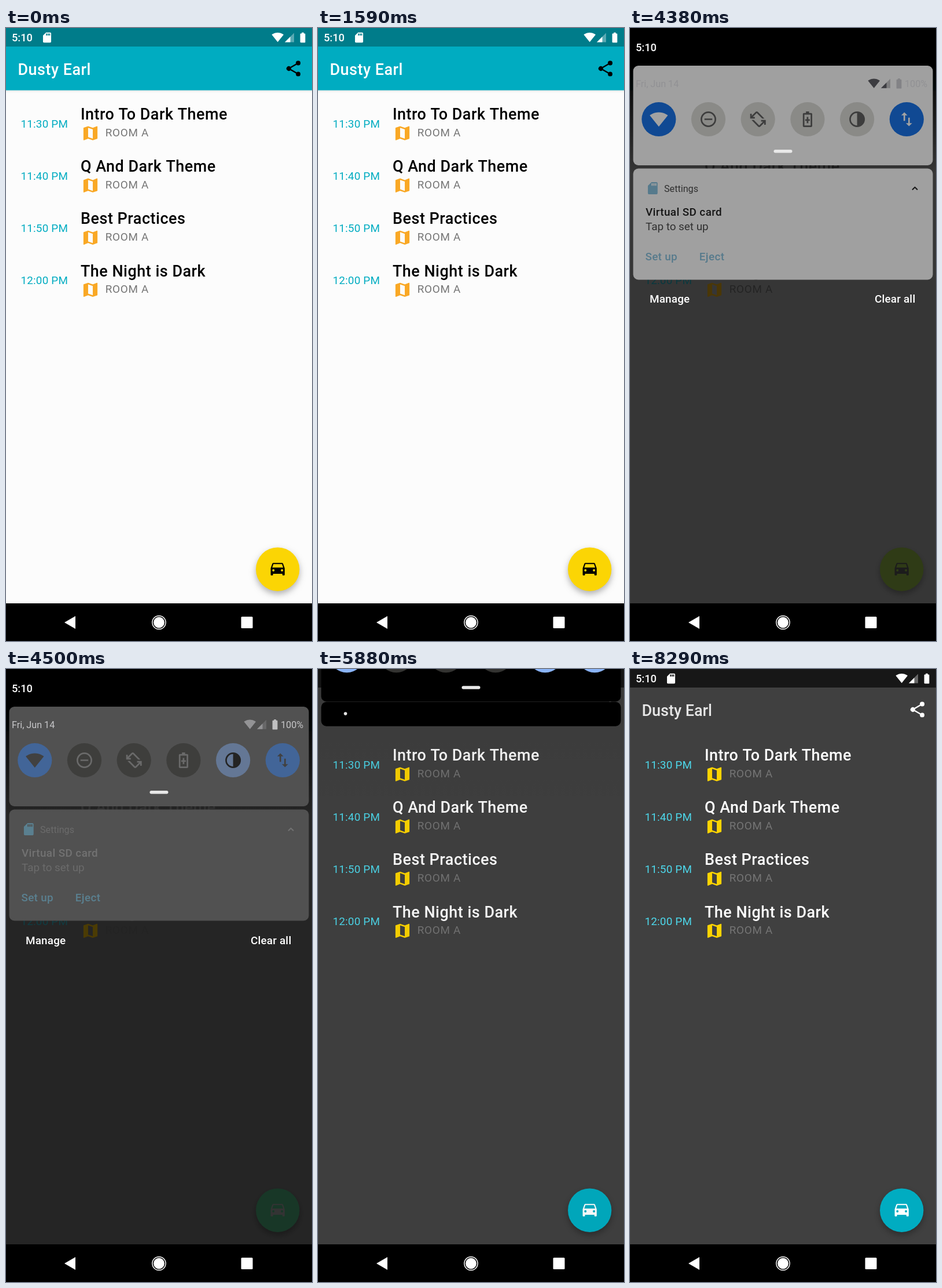
An HTML page with a canvas that plays this animation: 529 px wide and 1058 px high, repeating every 8.33 s.

```html
<!DOCTYPE html>
<html lang="en">
<head>
<meta charset="utf-8">
<title>Schedule</title>
<style>
html, body { margin: 0; width: 100%; height: 100%; overflow: hidden; background: #000; }
canvas { display: block; width: 100vw; height: 100vh; }
</style>
</head>
<body>
<canvas id="stage"></canvas>
<script>
const W = 529, H = 1058, LOOP = 8330, DP = 1.347;
const OPEN = [1620, 1920], CLOSE = [5702, 5961], THEME = [4240, 4625];

const canvas = document.getElementById('stage');
const ratio = window.devicePixelRatio || 1;
canvas.width = W * ratio;
canvas.height = H * ratio;
const ctx = canvas.getContext('2d');

const ICONS = {
  map: 'M20.5 3l-.16.03L15 5.1 9 3 3.36 4.9c-.21.07-.36.25-.36.48V20.5c0 .28.22.5.5.5l.16-.03L9 18.9l6 2.1 5.64-1.9c.21-.07.36-.25.36-.48V3.5c0-.28-.22-.5-.5-.5zM15 19l-6-2.11V5l6 2.11V19z',
  car: 'M18.92 6.01C18.72 5.42 18.16 5 17.5 5h-11c-.66 0-1.21.42-1.42 1.01L3 12v8c0 .55.45 1 1 1h1c.55 0 1-.45 1-1v-1h12v1c0 .55.45 1 1 1h1c.55 0 1-.45 1-1v-8l-2.08-5.99zM6.5 16a1.5 1.5 0 1 1 0-3 1.5 1.5 0 0 1 0 3zm11 0a1.5 1.5 0 1 1 0-3 1.5 1.5 0 0 1 0 3zM5 11l1.5-4.5h11L19 11H5z',
  share: 'M18 16.08c-.76 0-1.44.3-1.96.77L8.91 12.7c.05-.23.09-.46.09-.7s-.04-.47-.09-.7l7.05-4.11c.54.5 1.25.81 2.04.81a3 3 0 1 0-3-3c0 .24.04.47.09.7L8.04 9.81A3 3 0 1 0 8.04 14.19l7.12 4.16c-.05.21-.08.43-.08.65a2.92 2.92 0 1 0 2.92-2.92z',
  wifi: 'M12 21.5L23.64 7c-.45-.34-4.93-4-11.64-4S.81 6.66.36 7z',
  card: 'M18 2h-8L4.02 8 4 20c0 1.1.9 2 2 2h12c1.1 0 2-.9 2-2V4c0-1.1-.9-2-2-2zm-6 6h-2V4h2v4zm3 0h-2V4h2v4zm3 0h-2V4h2v4z',
  battery: 'M15.67 4H14V2h-4v2H8.33C7.6 4 7 4.6 7 5.33v15.33C7 21.4 7.6 22 8.33 22h7.33c.74 0 1.34-.6 1.34-1.33V5.33C17 4.6 16.4 4 15.67 4z',
  data: 'M9 3L5 6.99h3V14h2V6.99h3L9 3zm7 14.01V10h-2v7.01h-3L15 21l4-3.99h-3z',
  dnd: 'M12 2a10 10 0 1 0 0 20a10 10 0 1 0 0-20zm0 2a8 8 0 1 1 0 16a8 8 0 1 1 0-16zM7 11h10v2H7z',
  saver: 'M10 2h4v2h2.6c.8 0 1.4.6 1.4 1.4v15.2c0 .8-.6 1.4-1.4 1.4H7.4c-.8 0-1.4-.6-1.4-1.4V5.4C6 4.6 6.6 4 7.4 4H10zM8 6v14h8V6zM11 9h2v3h2v2h-2v3h-2v-3H9v-2h2z',
  contrast: 'M12 2a10 10 0 1 0 0 20a10 10 0 1 0 0-20zm0 2v16a8 8 0 1 1 0-16z',
  rotate: 'M4 7.59l5-5c.78-.78 2.05-.78 2.83 0L20.24 11h-2.83L10.4 4 5.41 9H8v2H2V5h2V7.59zM20 19h2v-6h-6v2h2.59l-4.99 5-7.01-7H3.76l8.41 8.41c.78.78 2.05.78 2.83 0l5-5V19z'
};
for (const name in ICONS) ICONS[name] = new Path2D(ICONS[name]);

const TALKS = [
  ['11:30 PM', 'Intro To Dark Theme'],
  ['11:40 PM', 'Q And Dark Theme'],
  ['11:50 PM', 'Best Practices'],
  ['12:00 PM', 'The Night is Dark']
];
// icon, on in the light theme, on in the dark theme
const TILES = [
  ['wifi', 1, 1], ['dnd', 0, 0], ['rotate', 0, 0],
  ['saver', 0, 0], ['contrast', 0, 1], ['data', 1, 1]
];

const clamp = v => Math.min(1, Math.max(0, v));
const span = (t, a, b) => clamp((t - a) / (b - a));
const smooth = u => u * u * (3 - 2 * u);

function mix(a, b, k) {
  const part = (hex, i) => parseInt(hex.slice(i, i + 2), 16);
  return '#' + [1, 3, 5].map(i =>
    Math.round(part(a, i) + (part(b, i) - part(a, i)) * k).toString(16).padStart(2, '0')).join('');
}

function text(str, x, y, size, color, weight = 400, spacing = 0) {
  ctx.font = `${weight} ${size}px Roboto, sans-serif`;
  ctx.letterSpacing = spacing + 'px';
  ctx.fillStyle = color;
  ctx.fillText(str, x, y);
}

function icon(name, x, y, scale, color) {
  ctx.save();
  ctx.translate(x, y);
  ctx.scale(scale, scale);
  ctx.translate(-12, -12);
  ctx.fillStyle = color;
  ctx.fill(ICONS[name], 'evenodd');
  ctx.restore();
}

function rect(x, y, w, h, color, r = 0) {
  ctx.fillStyle = color;
  ctx.beginPath();
  ctx.roundRect(x, y, w, h, r);
  ctx.fill();
}

function disc(x, y, r, color) {
  ctx.fillStyle = color;
  ctx.beginPath();
  ctx.arc(x, y, r, 0, Math.PI * 2);
  ctx.fill();
}

function poly(color, ...points) {
  ctx.fillStyle = color;
  ctx.beginPath();
  points.forEach(([x, y]) => ctx.lineTo(x, y));
  ctx.fill();
}

function faded(alpha, draw) {
  if (alpha <= 0) return;
  ctx.save();
  ctx.globalAlpha *= alpha;
  draw();
  ctx.restore();
}

function systemIcons(dx, dy, color, batteryColor) {
  ctx.save();
  ctx.translate(dx, dy);
  icon('wifi', 469.7, 16, 0.88, color);
  faded(0.35, () => poly(color, [482, 24.5], [498, 24.5], [498, 8.5]));
  poly(color, [482, 24.5], [491.5, 24.5], [491.5, 15]);
  icon('battery', 513, 16.5, 0.88, batteryColor);
  ctx.restore();
}

function drawApp(k, statusAlpha) {
  const ink = mix('#000000', '#ffffff', k);
  rect(0, 0, W, H, mix('#fcfcfc', '#404040', k));

  // toolbar and its shadow
  const shade = ctx.createLinearGradient(0, 107, 0, 112);
  shade.addColorStop(0, `rgba(0,0,0,${0.08 * (1 - k)})`);
  shade.addColorStop(1, 'rgba(0,0,0,0)');
  rect(0, 107, W, 5, shade);
  rect(0, 32, W, 75.5, mix('#00acc1', '#404040', k));
  rect(0, 0, W, 32, mix('#007c8a', '#171717', k));
  text('Dusty Earl', 20.5, 80.8, 20 * DP, mix('#ffffff', '#e6e6e6', k), 500, k > 0.5 ? 0 : 0.5);
  icon('share', 497, 70, DP, ink);

  faded(statusAlpha, () => {
    text('5:10', 10, 23, 18.2, '#ffffff', 500);
    icon('card', 71, 16.5, 0.88, '#ffffff');
    systemIcons(0, 0, '#ffffff', '#ffffff');
  });

  TALKS.forEach(([time, title], i) => {
    const y = i * 90.1;
    text(time, 25.5, y + 171.5, 14 * DP, mix('#00acc1', '#4dd9ec', k), 400, 0.2);
    text(title, 129, y + 158.2, 20 * DP, ink, 500, 0.5);
    icon('map', 146, y + 181.6, DP, mix('#f9a825', '#fdd400', k));
    text('ROOM A', 171.8, y + 186.6, 14 * DP, '#757575', 400, 0.7);
  });

  ctx.save();
  ctx.shadowColor = 'rgba(0,0,0,.3)';
  ctx.shadowBlur = 11 * ratio;
  ctx.shadowOffsetY = 5 * ratio;
  disc(469.7, 934.2, 37.7, mix('#fbd504', '#00acc1', k));
  ctx.restore();
  icon('car', 469.7, 932.6, DP, ink);
}

function drawScrim(p) {
  const f = Math.max(0, 1.2 * p - 0.2);
  const depth = 0.5 * (1 - Math.cos(Math.PI * (1 - (1 - f) ** 2)));
  rect(0, 0, W, H, `rgba(0,0,0,${0.7 * depth})`);
  const top = ctx.createLinearGradient(0, 0, 0, 250);
  top.addColorStop(0, '#000');
  top.addColorStop(0.26, '#000');
  top.addColorStop(1, 'rgba(0,0,0,0)');
  faded(depth, () => {
    rect(0, 0, W, 250, top);
    text('5:10', 10, 39.5, 18.2, '#ffffff', 500);
  });
}

function drawCard(p, shift, panel, late) {
  const bottom = 434.5 * p;
  const top = Math.min(242.5 + shift, bottom - 42);
  const strong = mix('#161616', '#e4e4e4', late);
  const soft = mix('#303030', '#b4b4b4', late);
  const accent = mix('#567a8c', '#5f8796', late);
  ctx.save();
  rect(5.5, top, 518, bottom - top, panel, 9);
  ctx.clip();
  faded(span(p, 0.3, 0.7), () => {
    ctx.translate(0, shift);
    icon('card', 39.3, 276.5, 1.05, accent);
    text('Settings', 59, 282.8, 12 * DP, soft);
    ctx.strokeStyle = strong;
    ctx.lineWidth = 2;
    ctx.beginPath();
    ctx.moveTo(488, 279.3);
    ctx.lineTo(492.5, 274.8);
    ctx.lineTo(497, 279.3);
    ctx.stroke();
    text('Virtual SD card', 27, 324, 14 * DP, strong, 500, 0.4);
    text('Tap to set up', 27, 349, 14 * DP, soft);
    text('Set up', 26.5, 401, 14 * DP, accent, 500, 0.3);
    text('Eject', 119.8, 401, 14 * DP, accent, 500, 0.4);
  });
  faded(1 - span(p, 0.25, 0.4), () => disc(47.5, (top + bottom) / 2 - 0.7, 2.8, strong));
  ctx.restore();
}

function drawQuickSettings(shift, panel, k, late) {
  const toned = (light, dark) => mix(mix(light, '#000000', k), dark, late);
  ctx.save();
  ctx.translate(0, shift);
  rect(5.5, 65, 518, 172, panel, 9);
  const label = mix('#525256', '#ffffff', k);
  text('Fri, Jun 14', 10, 102.2, 12 * DP, label);
  systemIcons(-48, 79.3, mix('#3c3c40', '#ffffff', late), mix('#3c3c40', '#ffffff', k));
  text('100%', 475, 102.2, 12 * DP, label);

  TILES.forEach(([name, lightOn, darkOn], i) => {
    const x = 49.8 + i * 85.7;
    disc(x, 157.5, 29.6, toned(lightOn ? '#1a73e8' : '#d9d9d5', darkOn ? '#8ab4f8' : '#333331'));
    icon(name, x, 157.5, DP, toned(lightOn ? '#ffffff' : '#606060', darkOn ? '#2b2b2b' : '#c8c8c8'));
  });
  rect(248.5, 210, 32, 5.5, k > 0 ? '#e8e8e8' : '#e2e2e2', 2.7);
  ctx.restore();
}

function drawShade(p, k) {
  if (p <= 0) return;
  const shift = -234 * (1 - p);
  const late = smooth(span(k, 0.4, 1));
  const panel = mix('#fdfdfd', '#000000', k);
  drawScrim(p);
  drawCard(p, shift, panel, late);
  drawQuickSettings(shift, panel, k, late);
  faded(span(p, 0.7, 1), () => {
    const y = 474 + k;
    text('Manage', 34, y, 14 * DP, '#ffffff', 500, 0.2);
    text('Clear all', 423, y, 14 * DP, '#ffffff', 500, 0.2);
  });
}

function drawNavigation() {
  rect(0, 993, W, 65, '#000');
  poly('#fff', [101, 1026], [120, 1015], [120, 1037]);
  disc(264.5, 1026, 9.4, '#fff');
  ctx.strokeStyle = '#fff';
  ctx.lineWidth = 1.5;
  ctx.beginPath();
  ctx.arc(264.5, 1026, 11.6, 0, Math.PI * 2);
  ctx.stroke();
  rect(406.5, 1016, 20, 20, '#fff', 1.5);
}

function render(t) {
  const opened = 1 - (1 - span(t, ...OPEN)) ** 2;
  const p = opened * (1 - smooth(span(t, ...CLOSE)));
  const k = span(t, ...THEME);
  const statusAlpha = t < 3000 ? 1 - span(t, 1620, 1720) : span(t, 5960, 6160);
  ctx.setTransform(ratio, 0, 0, ratio, 0, 0);
  drawApp(k, statusAlpha);
  drawShade(p, k);
  drawNavigation();
}

function tick() {
  render(performance.now() % LOOP);
  requestAnimationFrame(tick);
}
tick();
</script>
</body>
</html>
```
